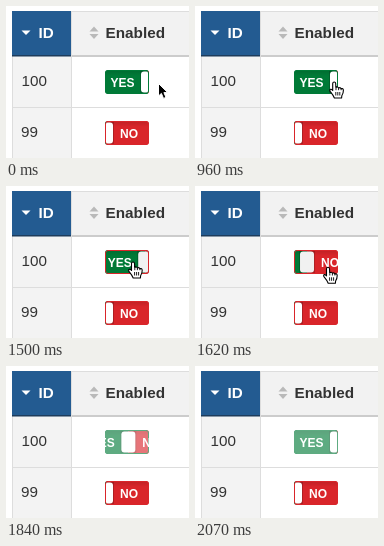
These frames come from a looping animation (183x152 px, 2.96 s). An HTML page with a canvas:

```html
<!DOCTYPE html>
<html lang="en">
<head>
<meta charset="utf-8">
<title>Toggle in a table</title>
<style>
html, body { margin: 0; width: 100%; height: 100%; overflow: hidden; background: #fff; }
canvas { display: block; width: 183px; height: 152px; }
</style>
</head>
<body>
<canvas id="stage"></canvas>
<script>
const W = 183, H = 152, LOOP = 2960;
const GREEN = '#007a37', RED = '#d9252a', INK = '#333';
const FONT = '"Liberation Sans", Arial, sans-serif';
const canvas = document.getElementById('stage');
const ctx = canvas.getContext('2d');
const dpr = window.devicePixelRatio || 1;
canvas.width = W * dpr;
canvas.height = H * dpr;

// The picture is refreshed at these moments and held in between.
const ticks = [0, 780, 840, 900, 960, 1020, 1080, 1140, 1200,
  1500, 1560, 1620, 1680, 1740, 1790, 1840, 1900, 1950, 2010, 2070];

// Pointer path: time, x, y
const path = [
  [0, 152, 77], [779, 152, 77], [780, 151, 76], [900, 145, 75.5], [1020, 133, 75.5],
  [1140, 126.8, 75.5], [1500, 126.8, 75.5], [1560, 128, 77],
  [1620, 132.8, 80.8], [1680, 145, 86], [1740, 160, 90]
];
const POINTER_GONE = 1790, PRESS = 1472, REVERT = 1735, SLIDE = 350;

function rect(x, y, w, h, color) {
  ctx.fillStyle = color;
  ctx.fillRect(x, y, w, h);
}

function poly(points, color) {
  ctx.beginPath();
  points.forEach(([x, y]) => ctx.lineTo(x, y));
  ctx.closePath();
  ctx.fillStyle = color;
  ctx.fill();
}

function text(str, x, y, size, color, weight = 'normal') {
  ctx.font = `${weight} ${size}px ${FONT}`;
  ctx.fillStyle = color;
  ctx.fillText(str, x, y);
}

function roundBox(x, y, w, h, r) {
  ctx.beginPath();
  ctx.roundRect(x, y, w, h, r);
}

// CSS "ease" curve: cubic-bezier(.25, .1, .25, 1)
function ease(x) {
  if (x <= 0) return 0;
  if (x >= 1) return 1;
  const bez = (a, b, u) => 3 * a * u * (1 - u) ** 2 + 3 * b * u * u * (1 - u) + u ** 3;
  let lo = 0, hi = 1;
  for (let i = 0; i < 24; i++) {
    const mid = (lo + hi) / 2;
    if (bez(.25, .25, mid) < x) lo = mid; else hi = mid;
  }
  return bez(.1, 1, lo);
}

function slideAt(t) {
  const out = ease((Math.min(t, REVERT) - PRESS) / SLIDE);
  return out * (1 - ease((t - REVERT) / SLIDE));
}

function pointerAt(t) {
  let i = 0;
  while (i < path.length - 2 && t >= path[i + 1][0]) i++;
  const a = path[i], b = path[i + 1];
  const k = Math.min(1, (t - a[0]) / (b[0] - a[0]));
  return [a[1] + (b[1] - a[1]) * k, a[2] + (b[2] - a[2]) * k];
}

// slide 0 shows YES, slide 1 shows NO
function toggle(y, slide, { on, faded = false, knob = '#fff' }) {
  const x = 99, w = 44, h = 24;
  const mid = x + w - 1 - slide * (w - 2);
  ctx.save();
  roundBox(x, y, w, h, 3);
  ctx.clip();
  rect(x, y, mid - x, h, GREEN);
  rect(mid, y, x + w - mid, h, RED);

  const shade = ctx.createLinearGradient(0, y, 0, y + 6);
  shade.addColorStop(0, 'rgba(0,0,0,.12)');
  shade.addColorStop(1, 'rgba(0,0,0,0)');
  rect(x, y, w, 6, shade);

  rect(mid - 8, y, 16, h, 'rgba(0,0,0,.2)');
  roundBox(x + .5, y + .5, w - 1, h - 1, 2.5);
  ctx.lineWidth = 1;
  ctx.strokeStyle = on ? GREEN : RED;
  ctx.stroke();
  if (faded) rect(x, y, w, h, 'rgba(255,255,255,.37)');

  text('YES', mid - 37.5, y + 17, 12, '#fff', 'bold');
  text('NO', mid + 14, y + 17, 12, '#fff', 'bold');
  roundBox(x + 1, y + 1, w - 2, h - 2, 2);
  ctx.clip();
  roundBox(mid - 7, y + 1.5, 14, h - 3, 3);
  ctx.fillStyle = knob;
  ctx.fill();
  ctx.restore();
}

function arrow(x, y) {
  ctx.save();
  ctx.translate(x, y);
  ctx.lineJoin = 'round';
  poly([[.5, .5], [.5, 13], [3.4, 10.4], [5.5, 15.4], [8, 14.4], [5.9, 9.6], [9.7, 9.6]], '#000');
  ctx.lineWidth = 1;
  ctx.strokeStyle = '#fff';
  ctx.stroke();
  ctx.restore();
}

function hand(x, y) {
  ctx.save();
  ctx.translate(x, y);
  ctx.beginPath();
  ctx.moveTo(-1.3, 9);
  ctx.lineTo(-1.3, 2);
  ctx.quadraticCurveTo(-1.2, .5, .2, .5);
  ctx.quadraticCurveTo(1.6, .5, 1.7, 2);
  ctx.lineTo(1.9, 6);
  ctx.quadraticCurveTo(3.6, 4.6, 4.7, 6.5);
  ctx.quadraticCurveTo(6.5, 5.4, 7.2, 7.3);
  ctx.quadraticCurveTo(9.2, 6.5, 9.4, 8.7);
  ctx.quadraticCurveTo(9.4, 12, 7.8, 14.2);
  ctx.lineTo(7.6, 16.5);
  ctx.lineTo(.4, 16.5);
  ctx.quadraticCurveTo(-.6, 13.7, -3.5, 10.3);
  ctx.quadraticCurveTo(-4.9, 8.4, -3.4, 7.8);
  ctx.quadraticCurveTo(-2.4, 7.6, -1.3, 9);
  ctx.closePath();
  ctx.fillStyle = '#fff';
  ctx.fill();
  ctx.lineJoin = 'round';
  ctx.lineWidth = 1.1;
  ctx.strokeStyle = '#000';
  ctx.stroke();
  ctx.beginPath();
  for (const fx of [2, 4.6, 7.1]) {
    ctx.moveTo(fx, 6.5);
    ctx.lineTo(fx, 8.7);
  }
  for (const fx of [1.8, 3.8, 5.8]) {
    ctx.moveTo(fx, 10.5);
    ctx.lineTo(fx, 14);
  }
  ctx.lineWidth = .9;
  ctx.stroke();
  ctx.restore();
}

function table() {
  rect(0, 0, W, H, '#fff');
  rect(6, 5, W - 6, 45, '#f2f2f2');
  rect(6, 5, W - 6, 1, '#ddd');
  rect(6, 50, 59, H - 50, '#f3f3f3');
  rect(6, 50, 1, H - 50, '#ddd');
  rect(65, 5, 1, H - 5, '#ddd');
  rect(66, 49, W - 66, 2, '#ccc');
  rect(6, 5, 59, 45, '#235b91');
  rect(6, 49, 59, 1.5, '#1d3c5c');
  rect(6, 101, W - 6, 1, '#ddd');
  poly([[15.5, 24.5], [24.5, 24.5], [20, 29]], '#fff');
  poly([[83.5, 25.5], [92.5, 25.5], [88, 20.5]], '#b9b9b9');
  poly([[83.5, 28], [92.5, 28], [88, 33]], '#b9b9b9');
  text('ID', 32.5, 32, 15.2, '#fff', 'bold');
  text('Enabled', 99.5, 32, 15.3, INK, 'bold');
  text('100', 15.5, 80, 15.2, INK);
  text('99', 15, 131, 15.2, INK);
}

function draw(now) {
  const time = now % LOOP;
  const t = ticks.filter(v => v <= time).pop();
  ctx.setTransform(dpr, 0, 0, dpr, 0, 0);
  table();
  const pressed = t >= PRESS && t < REVERT;
  toggle(64, t >= 2070 ? 0 : slideAt(t), {
    on: !pressed,
    faded: t >= REVERT,
    knob: pressed ? '#f1f1f1' : '#fff'
  });
  toggle(115, 1, { on: false });
  if (t < POINTER_GONE) {
    const [x, y] = pointerAt(t);
    (x < 143 ? hand : arrow)(x, y);
  }
}

const start = performance.now();
function loop() {
  draw(performance.now() - start);
  requestAnimationFrame(loop);
}
loop();
</script>
</body>
</html>
```
